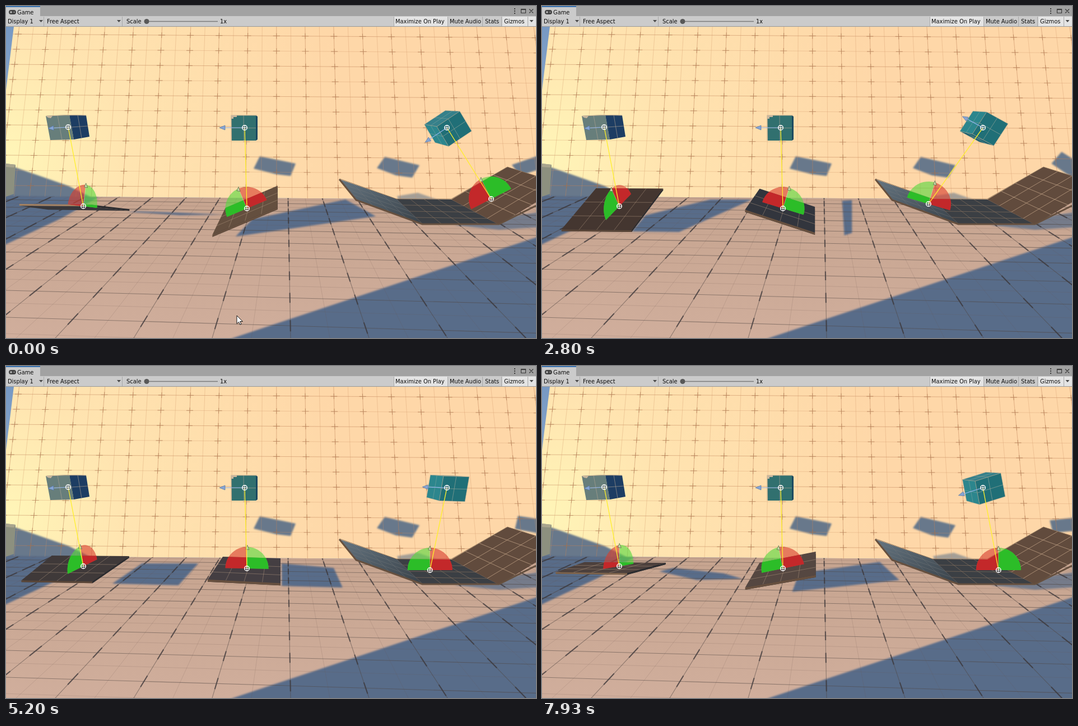
Animation, 946 px wide and 592 px high, one loop 8 s. Source, as an HTML page:

```html
<!DOCTYPE html>
<html lang="en">
<head>
<meta charset="utf-8">
<title>Game view</title>
<style>
html, body { margin: 0; width: 100%; height: 100%; overflow: hidden; background: #cbcbcb; }
svg { display: block; width: 946px; height: 592px; }
text { font: 9.9px "DejaVu Sans", sans-serif; fill: #0c0c0c; }
</style>
</head>
<body>
<svg viewBox="0 0 946 592" xmlns="http://www.w3.org/2000/svg">
  <defs>
    <linearGradient id="sky" x2="0" y2="1"><stop stop-color="#7799c4"/><stop offset="1" stop-color="#b4c3d4"/></linearGradient>
    <radialGradient id="wallFill" gradientUnits="userSpaceOnUse" cx="0" cy="270" r="620">
      <stop stop-color="#fff6b8"/><stop offset=".35" stop-color="#ffe4b0"/><stop offset="1" stop-color="#fed7a8"/>
    </radialGradient>
    <linearGradient id="floorFill" x2="0" y2="1"><stop stop-color="#c6a48f"/><stop offset="1" stop-color="#d0ae9c"/></linearGradient>
    <linearGradient id="rampFill" x2="1" y2="1"><stop stop-color="#647480"/><stop offset="1" stop-color="#394148"/></linearGradient>
    <filter id="soft" x="-20%" y="-20%" width="140%" height="140%"><feGaussianBlur stdDeviation="1.6"/></filter>
    <clipPath id="wallClip"><path d="M14 37H946V346L0 339V150Z"/></clipPath>
    <clipPath id="floorClip"><path d="M0 339L946 346V592H0Z"/></clipPath>
    <clipPath id="rampClip"><path d="M595 309L697 344L795 345L895 287L946 303V356L880 390L743 389L625 346Z"/></clipPath>
  </defs>
  <rect y="37" width="946" height="555" fill="url(#sky)"/>
  <path d="M14 37H946V346L0 339V150Z" fill="url(#wallFill)"/>
  <path d="M0 339L946 346V592H0Z" fill="url(#floorFill)"/>
  <g filter="url(#soft)" fill="#596c89">
    <g fill="#68788b">
      <path d="M-9 281L17 288L112 321L152 341H-9Z"/>
      <path d="M453 268L517 281L508 303L482 300L442 290Z"/>
      <path d="M676 269L738 284L725 306L696 302L662 289Z"/>
      <path d="M698 339L735 333L770 345L700 345Z" opacity=".6"/>
    </g>
    <path d="M-9 338L165 341L100 378L-9 429Z"/>
    <path d="M405 592L960 408V600H390Z"/>
    <path d="M800 391L960 366V394L880 399Z" opacity=".75"/>
  </g>
  <g id="shade" filter="url(#soft)"></g>
  <g id="grid"></g>
  <path d="M0 281L17 283L14 335L0 340Z" fill="#8d907f"/>
  <path d="M0 281L17 283L14 288L0 287Z" fill="#a9a58e"/>
  <g id="props"></g>
  <g id="live"></g>
  <path id="mouse" d="M412 552V566.5L415.4 563.4L417.8 568.2L420 567.2L417.7 562.5H422.3Z" fill="#fff" stroke="#000" stroke-width=".9"/>
  <g id="bar">
    <rect width="946" height="37" fill="#cbcbcb"/>
    <rect width="946" height="18" fill="#a2a2a2"/>
    <rect width="61" height="19" fill="#cbcbcb"/>
    <rect width="61" height="2" fill="#3a72b0"/>
    <rect y="36" width="946" height="1" fill="#999"/>
    <rect x="692" y="19" width="96" height="17" fill="#e4e4e4"/>
    <rect x="886" y="19" width="60" height="17" fill="#e4e4e4"/>
    <path d="M67.5 19V36M207.5 19V36M692.5 19V36M788.5 19V36M850.5 19V36M884.5 19V36M931.5 19V36" stroke="#a8a8a8"/>
    <path d="M59 25H66L62.5 29ZM198 25H205L201.500 29ZM934.500 25H941.500L938 29Z" fill="#484848"/>
    <path d="M251 27.500H378" stroke="#7c7c7c" stroke-width="1.500"/>
    <circle cx="251" cy="27.500" r="4.500" fill="#585858"/>
    <rect x="5" y="7" width="13" height="8" rx="4" fill="#444"/>
    <path d="M7 11H11M9 9V13M13.500 11H15.500" stroke="#ddd"/>
    <path d="M907 4H909V6H907ZM907 8H909V10H907ZM907 12H909V14H907Z" fill="#3c3c3c"/>
    <path d="M919.500 5.500H927.500V12.500H919.500ZM919.500 6.500H927.500M934 5.500L941 12.500M941 5.500L934 12.500" fill="none" stroke="#3c3c3c" stroke-width="1.200"/>
    <text x="20" y="15">Game</text><text x="3" y="31">Display 1</text><text x="73" y="31">Free Aspect</text>
    <text x="215" y="31">Scale</text><text x="382" y="31">1x</text><text x="695" y="31">Maximize On Play</text>
    <text x="792" y="31">Mute Audio</text><text x="855" y="31">Stats</text><text x="889" y="31">Gizmos</text>
  </g>
</svg>
<script>
const $ = id => document.getElementById(id);
const LOOP = 8000, STEP = 200 / 3, RAD = Math.PI / 180;
const RED = ['#d8402f', '#c3282a'], GREEN = ['#5ad840', '#2cbd28'];

const pairs = a => a.reduce((r, v, i) => (i % 2 ? r[r.length - 1].push(v) : r.push([v]), r), []);
const poly = p => 'M' + p.map(q => q.map(v => v.toFixed(1))).join('L') + 'Z';
const fill = (d, color, extra = '') => `<path d="${d}" fill="${color}" ${extra}/>`;
const line = (d, color, w, o = 1) => `<path d="${d}" fill="none" stroke="${color}" stroke-width="${w}" opacity="${o}"/>`;
const at = (a, b, k) => a.map((v, i) => v + (b[i] - v) * k);
const area = p => p.reduce((s, q, i) => {
  const n = p[(i + 1) % p.length];
  return s + q[0] * n[1] - n[0] * q[1];
}, 0);

// Lines across a four-cornered face.
function mesh([a, b, c, d], nx, ny) {
  let out = '';
  const seg = (p, q) => out += `M${p.map(v => v.toFixed(1))}L${q.map(v => v.toFixed(1))}`;
  for (let i = 1; i < nx; i++) seg(at(a, b, i / nx), at(d, c, i / nx));
  for (let j = 1; j < ny; j++) seg(at(a, d, j / ny), at(b, c, j / ny));
  return out;
}

// Linear blend between rows of [s, ...values].
function keyed(rows, s) {
  let i = 0;
  while (i < rows.length - 2 && s > rows[i + 1][0]) i++;
  const [a, b] = [rows[i], rows[i + 1]];
  return at(a, b, (s - a[0]) / (b[0] - a[0])).slice(1);
}

// Quadratic through the poses at s = -1, 0 and 1.
const swing = ([lo, mid, hi], s) =>
  mid.map((m, i) => m + s * (hi[i] - lo[i]) / 2 + s * s * ((hi[i] + lo[i]) / 2 - m));

function tint(a, b, k) {
  const rgb = h => [1, 3, 5].map(i => parseInt(h.slice(i, i + 2), 16));
  return `rgb(${at(rgb(a), rgb(b), k).map(Math.round)})`;
}

const leftPose = [
  [109, 318, 213, 318, 165, 408, 41, 407],
  [81, 339, 220, 340, 154, 383, 27, 381],
  [76, 364, 220, 366, 152, 349, 24, 348]];
const midPose = [
  [391, 317, 483, 367, 483, 413, 367, 353],
  [387, 341, 490, 342, 490, 386, 360, 382],
  [393, 363, 483, 317, 483, 354, 371, 412]];
const leftFan = [[-20, 31, -20, -27], [-28, 13, -5, -36], [-27, -6, 6, -38]];
const leftShade = [
  [-1, 175, 408, 198, 378, 335, 341, 382, 343, 240, 406],
  [-.64, 160, 402, 185, 373, 300, 345, 375, 345, 245, 403],
  [-.04, 190, 388, 243, 352, 300, 352, 343, 352, 308, 391],
  [.36, 208, 366, 235, 359, 325, 370, 353, 381, 270, 383],
  [.86, 215, 367, 235, 366, 320, 369, 390, 372, 310, 373]];
const midShade = [
  [-1, 505, 416, 503, 371, 575, 343, 584, 371],
  [-.64, 540, 409, 536, 347, 553, 346, 553, 405],
  [-.04, 492, 392, 492, 352, 585, 360, 601, 395],
  [.36, 453, 401, 462, 368, 602, 350, 634, 383],
  [.86, 410, 411, 440, 380, 606, 345, 660, 375]];
const hits = [
  [-1, 647, 337], [-.643, 690, 353], [-.4, 718, 363], [-.04, 757, 364],
  [.362, 806, 364], [.437, 815, 364], [.64, 838, 361], [.774, 856, 350], [.863, 866, 344]];

function buildGrid() {
  let thin = '', bold = '', ticks = '';
  const wx = (x, y) => 480 + (x - 480) * (y + 3720) / 3770;
  const wy = (j, x) => 50 + 27 * j + x * .007;
  for (let i = -2; i < 39; i++) {
    const x = 22 + 25.6 * i;
    const d = `M${wx(x, 37)} 37L${wx(x, 346)} 346`;
    if (i % 2) thin += d; else bold += d;
    for (let j = 0; j < 11 && i % 2 === 0; j++) {
      const y = wy(j, x);
      ticks += `M${wx(x, y - 5)} ${y - 5}L${wx(x, y + 5)} ${y + 5}M${wx(x, y) - 6} ${y}h12`;
    }
  }
  for (let j = 0; j < 11; j++) {
    const d = `M0 ${wy(j, 0)}L946 ${wy(j, 946)}`;
    if (j % 2) thin += d; else bold += d;
  }
  let out = '<g clip-path="url(#wallClip)">' + line(thin, '#cf9468', .8, .42) +
    line(bold, '#bd8258', .9, .55) + line(ticks, '#a06a44', 1.2, .5) + '</g>';

  thin = bold = ticks = '';
  const fx = (i, y) => 500 + (8 + 70 * i) * (y - 150) / 442;
  const row = j => 150 + 1 / (.00238 + .00016 * j);
  const tilt = y => .03 * (y - 150) / 420;
  for (let i = -19; i < 20; i++) {
    const d = `M${fx(i, 330)} 330L${fx(i, 600)} 600`;
    if (i % 2) thin += d; else bold += d;
  }
  for (let j = -2; j < 19; j++) {
    const y = row(j), k = tilt(y), d = `M0 ${y - 505 * k}L946 ${y + 441 * k}`;
    if (j % 2) { thin += d; continue; }
    bold += d;
    for (let i = -18; i < 19; i += 2) {
      const x = fx(i, y), yy = y + (x - 505) * k, h = (y - 150) / 42;
      ticks += `M${fx(i, yy - h)} ${yy - h}L${fx(i, yy + h)} ${yy + h}`;
    }
  }
  return out + '<g clip-path="url(#floorClip)">' + line(thin, '#6b554c', .7, .25) +
    line(bold, '#4f4440', 1.1, .5) + line(ticks, '#383436', 2.2, .65) + '</g>';
}

const ring = ([x, y]) => `<g transform="translate(${x.toFixed(1)} ${y.toFixed(1)})">` +
  '<circle r="4.3" fill="#222" fill-opacity=".25" stroke="#fff" stroke-width="1.4"/>' +
  line('M-4 0H4M0-4V4', '#fff', 1) + '</g>';

function arrow([x, y], [dx, dy]) {
  const len = Math.hypot(dx, dy), ux = dx / len, uy = dy / len;
  const tip = [x + dx, y + dy], bx = tip[0] - ux * -4, by = tip[1] - uy * -4;
  const back = [bx - ux * 10, by - uy * 10];
  const head = [[bx, by], [back[0] - uy * 4, back[1] + ux * 4], [back[0] + uy * 4, back[1] - ux * 4]];
  return line(`M${x} ${y}L${tip}`, '#8fb4ea', 1.2) +
    fill(poly(head), '#86a5d4', 'stroke="#5273a4" stroke-width=".7"');
}

function face(p, color, lines, n, o = .7) {
  return fill(poly(p), color) + line(mesh(p, n, n), lines, .9, o);
}

function buildProps() {
  const box = (nums, color) => face(pairs(nums), color, '#b5a793', 2, .65);
  const panels = [
    face(pairs([595, 309, 697, 344, 743, 388, 625, 345]), 'url(#rampFill)', '#7b7d7c', 4, .45),
    face(pairs([697, 344, 795, 345, 880, 390, 743, 388]), '#3b3f44', '#88715f', 4),
    face(pairs([795, 345, 895, 287, 997, 319, 880, 390]), '#614b3d', '#c9aa8c', 4, .75)];
  return panels.join('') +
    line('M595 309L625 346L743 389H880L946 356', '#66503f', 3) +
    line('M595 308L697 344H795L895 287L946 303', '#8b7159', .9) +
    box([71, 196, 113, 194, 121, 238, 79, 239], '#677e7b') +
    box([113, 194, 143, 195, 149, 233, 121, 238], '#1d3d63') +
    line('M72 196L113 194.500L143 195', '#c2ad91', 1.2) +
    box([402, 195, 446, 195, 446, 240, 403, 240], '#31706f') +
    fill('M446 195L449 197V238L446 240Z', '#1b4a60') +
    line('M402 240V195H448', '#c2ad91', 1.1) +
    fill('M402 195H412V198H406V201H402ZM71 196H83L80 200L75 199Z', '#c9b79d');
}

function slab(p, h, top, front, side, nx, ny) {
  const low = p.map(([x, y]) => [x, y + h]);
  const [, b, c, d] = p, [, lb, lc, ld] = low;
  return fill(poly(low), '#38373a') +
    (area(p) > 0 ? fill(poly(p), top) + line(mesh(p, nx, ny), '#b79c84', .9, .5) : '') +
    fill(poly([d, c, lc, ld]), front) + fill(poly([c, b, lb, lc]), side);
}

// Half disc spanned by u (left end) and n (normal), split at the normal.
function fan(c, u, n, greenLeft, clip, back = 1) {
  const wedge = from => {
    const p = [c];
    for (let i = 0; i <= 12; i++) {
      const a = (from + i * 7.5) * RAD, k = Math.cos(a) * (a > Math.PI / 2 ? back : 1);
      p.push([c[0] + u[0] * k + n[0] * Math.sin(a), c[1] + u[1] * k + n[1] * Math.sin(a)]);
    }
    return poly(p);
  };
  const l = wedge(0), r = wedge(90), [cl, cr] = greenLeft ? [GREEN, RED] : [RED, GREEN];
  const tip = [c[0] + n[0], c[1] + n[1]];
  return fill(l, cl[0], 'opacity=".62"') + fill(r, cr[0], 'opacity=".62"') +
    `<g clip-path="url(#${clip})">${fill(l, cl[1])}${fill(r, cr[1])}</g>` +
    line(`M${c}L${tip}`, '#d9e8b8', .8, .55) +
    fill(poly([[tip[0], tip[1] - 3], [tip[0] + 3, tip[1] + 5], [tip[0] - 3, tip[1] + 4]]), '#c9d8a8',
      'stroke="#4b6440" stroke-width=".7"');
}

function turn(x, y, a) {
  const c = Math.cos(a), s = Math.sin(a), v = x * s + y * c;
  return [x * c - y * s - .14 * v, v];
}

function cube(a) {
  const quad = (cx, cy, w, h) => [[-w, -h], [w, -h], [w, h], [-w, h]].map(([x, y]) => {
    const [dx, dy] = turn(x, y, a);
    return [cx + dx, cy + dy];
  });
  const near = quad(800, 219, 23, 22), far = quad(775, 215, 21, 20);
  const tones = ['#36808a', '#1c5566', '#1f6270', '#2c868d'];
  const sides = tones.map((tone, i) => {
    const j = (i + 1) % 4, p = [far[i], far[j], near[j], near[i]];
    return area(p) > 0 ? face(p, tone, '#9fb0a4', 2, .45) + line(poly(p), '#a9a692', .8, .6) : '';
  });
  return sides.join('') + face(near, '#206f77', '#a5ab9c', 2, .65) + line(poly(near), '#b5a892', .9, .6);
}

const yellow = (a, b) => line(`M${a}L${b}`, '#fff02a', 1.3);
const clip = (id, p) => `<clipPath id="${id}"><path d="${poly(p)}"/></clipPath>`;

function draw(ms) {
  const t = Math.floor((ms + 5) / STEP) * STEP / 1000;
  const s = Math.cos(t - .53), tilt = -26.5 * s * RAD, spin = -42 * s * RAD;

  const wallSpot = [[-28, -18], [28, -10], [30, 18], [-28, 8]].map(([x, y]) => {
    const [dx, dy] = turn(x, y * 1.2, spin);
    return [938 + dx, 284 + dy * .75];
  });
  $('shade').innerHTML = fill(poly(pairs(keyed(leftShade, s))), '#596c89') +
    fill(poly(pairs(keyed(midShade, s))), '#596c89') + fill(poly(wallSpot), '#68788b');

  const left = pairs(swing(leftPose, s)), mid = pairs(swing(midPose, s));
  const k = Math.abs(s), lf = swing(leftFan, s);
  const lp = [138, 357], mp = [430, 361], hit = keyed(hits, s);
  const slope = (hit[0] < 718 ? 16.5 : hit[0] > 838 ? -27 : 0) * RAD;
  const axes = (a, r) => [[-r * Math.cos(a), -r * Math.sin(a)], [r * Math.sin(a), -r * Math.cos(a)]];
  const greenLeft = hit[0] < 763 || (hit[0] > 838 && hit[0] < 861);
  const c1 = [111, 216], c2 = [426, 217], c3 = [787, 217];

  $('live').innerHTML = clip('leftClip', left) + clip('midClip', mid) +
    slab(left, 3, tint('#3f393a', s < 0 ? '#46342a' : '#5c4a3e', k), tint('#5a4638', '#b08a66', Math.max(0, s)), '#2c2c2f', 4, 3) +
    slab(mid, 4, tint('#453f42', s < 0 ? '#27303a' : '#69523f', k), '#67503f', '#3a332f', 4, 3) +
    cube(spin) +
    arrow(c1, [-32, 2]) + arrow(c2, [-41, 0]) + arrow(c3, turn(-40, 0, spin)) +
    fan(lp, lf.slice(0, 2), lf.slice(2), s < 0, 'leftClip', .88) +
    fan(mp, ...axes(tilt * -1 * -1, 38.5), s > 0, 'midClip') +
    fan(hit, ...axes(slope, 40), greenLeft, 'rampClip') +
    yellow(c1, lp) + yellow(c2, mp) + yellow(c3, hit) +
    [c1, c2, c3, lp, mp, hit].map(ring).join('');
  $('mouse').style.display = ms < 400 ? '' : 'none';
}

$('grid').innerHTML = buildGrid();
$('props').innerHTML = buildProps();
const start = performance.now();
function tick() {
  draw((performance.now() - start) % LOOP);
  requestAnimationFrame(tick);
}
tick();
</script>
</body>
</html>
```
